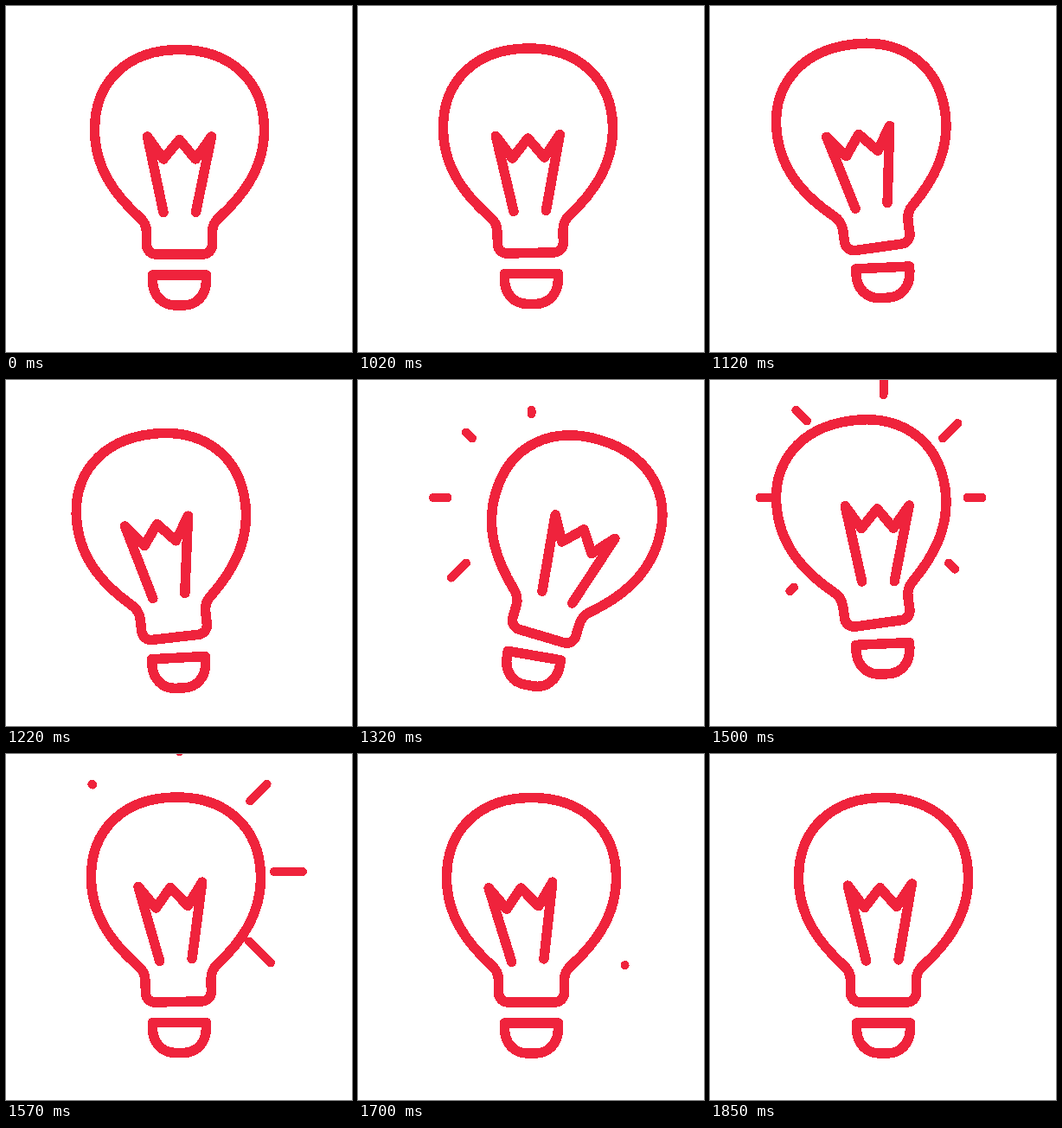
These frames come from a looping animation (400 px wide and 400 px high, 1870 ms). An HTML page:

```html
<!DOCTYPE html>
<html lang="en">
<head>
<meta charset="utf-8">
<title>Light bulb</title>
<style>
html, body { margin: 0; height: 100%; overflow: hidden; background: #fff; }
svg { display: block; width: 100%; height: 100%; shape-rendering: crispEdges; }
svg * { fill: none; stroke: #ef233c; stroke-linecap: round; stroke-linejoin: round; }
</style>
</head>
<body>
<svg viewBox="0 0 400 400" stroke-width="11.5">
  <g id="lamp">
    <g id="bulb">
      <path d="M200.5 50.5C142 50.5 102.5 86 102.5 143C102.5 190 130 222 154 244Q162.5 251 162.5 262V276a11 11 0 0 0 11 11h54a11 11 0 0 0 11 -11V262Q238.5 251 247 244C271 222 298.5 190 298.5 143C298.5 86 259 50.5 200.5 50.5Z"/>
      <path id="wire" d="M182 238.5L163.5 151L182 177L200.5 154.5L219 177L237.5 151L219.5 238.5"/>
    </g>
    <path id="cap" d="M169.5 311H231.5V317C231.5 335 220 346 205 346H196C181 346 169.5 335 169.5 317Z"/>
  </g>
  <path id="rays" stroke-width="10"/>
</svg>
<script>
const LOOP = 1870, START = 1020, STEP = 25;
const $ = id => document.getElementById(id);

function ease(x) {
  x = Math.min(1, Math.max(0, x));
  return x * x * (3 - 2 * x);
}

// Swings from rest through the given [time, value] turning points and back to rest.
function swing(t, end, ...turns) {
  let value = 0, from = [START - STEP, 0];
  for (const to of [...turns, [end, 0]]) {
    value += (to[1] - from[1]) * ease((t - from[0]) / (to[0] - from[0]));
    from = to;
  }
  return value;
}

function turn(id, angle, pivotY) {
  $(id).setAttribute('transform', `rotate(${angle} 200.5 ${pivotY})`);
}

// Seven rays go clockwise from the lower left; the right-hand ones are a quicker second burst.
function ray(i, t) {
  const angle = (135 + 45 * i) * Math.PI / 180;
  const late = i > 3, pace = late ? 0.75 : 1;
  const age = (t - (late ? 1420 : 1221)) / pace - 21 * (late ? i - 4 : i);
  const head = ease(age / 192), tail = ease((age - 102) / 225);
  if (head <= tail) return '';
  const near = 97 + 14 * Math.max(0, Math.sin(angle));
  const point = k => {
    const r = near + 46 * k;
    return `${200.5 + r * Math.cos(angle)} ${136 + r * Math.sin(angle)}`;
  };
  return `M${point(tail)}L${point(head)}`;
}

function draw(now) {
  const time = now % LOOP;
  const t = time < START ? 0 : START + Math.floor((time - START) / STEP) * STEP;
  const lift = swing(t, 1595, [1095, -10], [1265, 14.3], [1420, -10]);
  $('lamp').setAttribute('transform', `translate(0 ${lift})`);
  turn('bulb', swing(t, 1595, [1095, -8], [1200, -8], [1340, 18], [1495, -8]), 328);
  turn('wire', swing(t, 1970, [1200, -3], [1430, 12.3], [1620, -6]), 287);
  turn('cap', swing(t, 1595, [1200, -4], [1330, 10], [1430, -4]), 331);
  $('rays').setAttribute('d', [0, 1, 2, 3, 4, 5, 6].map(i => ray(i, t)).join(''));
}

const origin = performance.now();
function tick() {
  draw(performance.now() - origin);
  requestAnimationFrame(tick);
}
tick();
</script>
</body>
</html>
```
